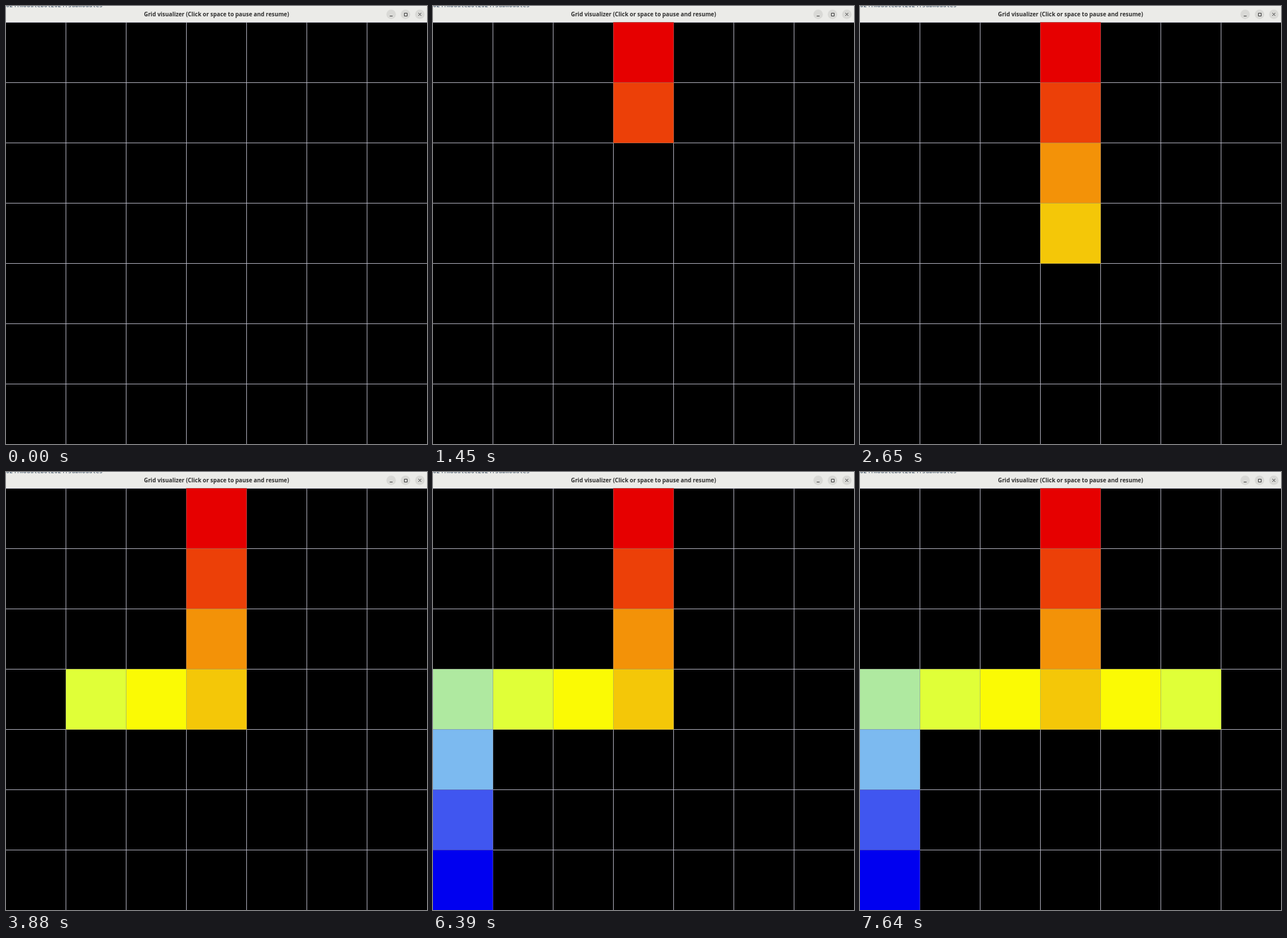
Write an HTML page with a canvas that moves like this. It is 734x763 px and loops after 8000 ms.

```html
<!DOCTYPE html>
<html lang="en">
<head>
<meta charset="utf-8">
<title>Grid visualizer</title>
<style>
  html, body { margin: 0; height: 100%; overflow: hidden; background: #000; }
  canvas { display: block; }
</style>
</head>
<body>
<canvas id="stage" width="734" height="763"></canvas>
<script>
const ctx = document.getElementById('stage').getContext('2d');
const LOOP = 8000, CELL = 105, LEFT = -1, TOP = 28;

// Colour by distance from the starting cell at the top centre.
const COLORS = ['#e60000', '#ec4008', '#f39208', '#f4c708', '#fbfa04',
                '#e0ff38', '#afe9a0', '#7cbaf0', '#4056f0', '#0000f0'];

// Visited cells: [time, column, row]
const VISITS = [
  [760, 3, 0], [1390, 3, 1], [2010, 3, 2], [2650, 3, 3],
  [3250, 2, 3], [3880, 1, 3], [4500, 0, 3], [5150, 0, 4],
  [5750, 0, 5], [6390, 0, 6], [7000, 4, 3], [7640, 5, 3]
];

function rect(color, x, y, w, h) {
  ctx.fillStyle = color;
  ctx.fillRect(x, y, w, h);
}

function drawTitleBar() {
  rect('#f0f0ee', 0, 0, 734, 2);
  ctx.save();
  ctx.beginPath();
  ctx.rect(0, 0, 734, 2);
  ctx.clip();
  ctx.fillStyle = '#34495e';
  ctx.textAlign = 'left';
  ctx.font = '10px "DejaVu Sans Mono", monospace';
  ctx.fillText('024.modulebot2024.submodules', 0, 2);
  ctx.restore();

  rect('#ebebe8', 0, 2, 734, 26);
  ctx.fillStyle = '#303030';
  ctx.textAlign = 'center';
  ctx.font = 'bold 9.9px "Open Sans", sans-serif';
  ctx.fillText('Grid visualizer (Click or space to pause and resume)', 367, 18);

  for (const x of [671.5, 696.5, 721.5]) {
    ctx.fillStyle = '#d9d9d6';
    ctx.beginPath();
    ctx.arc(x, 14.5, 8.3, 0, 7);
    ctx.fill();
  }
  ctx.strokeStyle = '#333';
  ctx.lineWidth = 1;
  ctx.stroke(new Path2D('M669 17.5h5 M694.5 12.5h5v5h-5z M719 12l5 5m0-5l-5 5'));
}

function drawGrid() {
  for (let i = 0; i <= 7; i++) {
    rect('#bcbcca', LEFT + i * CELL, TOP, 1, 735);
    rect('#bcbcca', 0, TOP + i * CELL, 734, 1);
  }
}

function drawCell(col, row) {
  const x = LEFT + col * CELL, y = TOP + row * CELL;
  rect(COLORS[row + Math.abs(col - 3)], x, y, CELL + 1, CELL + 1);
  ctx.strokeStyle = 'rgba(128,128,128,.5)';
  ctx.lineWidth = 1;
  ctx.strokeRect(x + .5, y + .5, CELL, CELL);
}

function draw() {
  const time = performance.now() % LOOP;
  rect('#000', 0, 0, 734, 763);
  drawGrid();
  for (const [start, col, row] of VISITS) {
    if (time >= start) drawCell(col, row);
  }
  drawTitleBar();
  requestAnimationFrame(draw);
}
draw();
</script>
</body>
</html>
```
